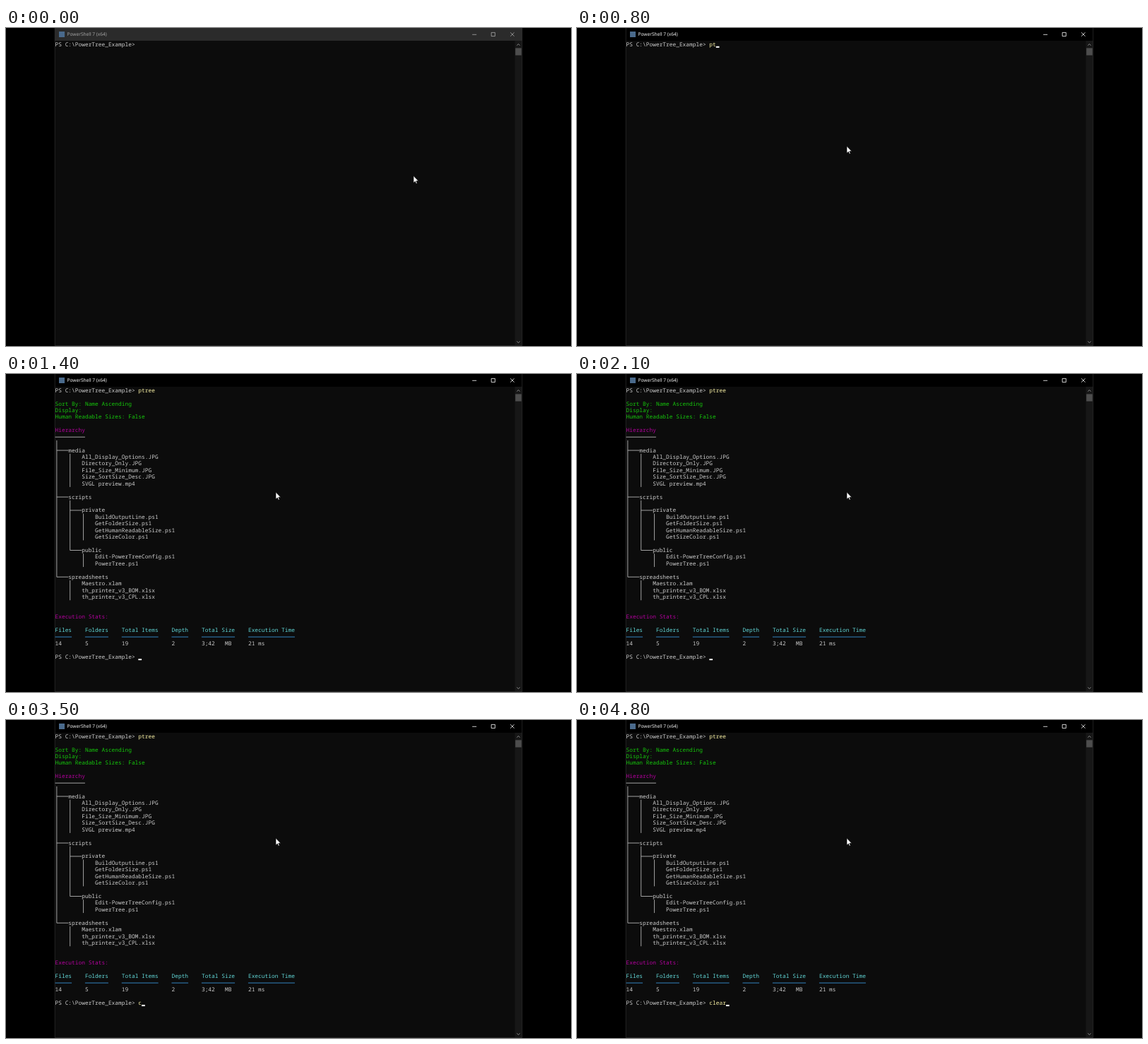
An HTML page for the animation above (5000 ms loop, 800 by 450 pixels).

```html
<!DOCTYPE html>
<html lang="en">
<head>
<meta charset="utf-8">
<title>Terminal tree listing</title>
<style>
  html, body { margin: 0; width: 100%; height: 100%; overflow: hidden; background: #000; }
  svg { display: block; width: 800px; height: 450px; }
  text { white-space: pre; text-rendering: geometricPrecision; }
  #title { font: 6.62px "Open Sans", "Noto Sans", sans-serif; }
  /* 18.333px gives an advance of 11 units, one terminal cell */
  #screen { font: 18.333px "Noto Sans Mono", "DejaVu Sans Mono", monospace; fill: #ccc; }
  #screen .green { fill: #16c60c; }
  #screen .magenta { fill: #b4009e; }
  #screen .cyan { fill: #61d6d6; }
  #screen .input { fill: #f9f1a5; }
  .lines path { fill: none; stroke: #bbb; stroke-width: 2; }
  .lines .rule { stroke: #3a96dd; }
  #bar { fill: #000; }
  #buttons { fill: none; stroke: #fff; stroke-width: .8; }
  #title { fill: #fff; }
  .inactive #bar { fill: #2b2b2b; }
  .inactive #buttons { stroke: #aaa; }
  .inactive #title { fill: #aaa; }
  .arrow { fill: none; stroke: #8a8a8a; stroke-width: 1; }
</style>
</head>
<body>
<svg id="stage" viewBox="0 0 800 450" class="inactive">
  <rect width="800" height="450"/>
  <rect x="69" width="662" height="450" fill="#0c0c0c"/>
  <rect id="bar" x="69" width="662" height="18"/>
  <rect x="75" y="5" width="8" height="8" fill="#4a6a8c"/>
  <text id="title" x="86.5" y="11.4"></text>
  <path id="buttons" d="M660.2 9.3h6M687.2 6.4h5.2v5.2h-5.2zM714.2 6.3l5.4 5.4M719.6 6.3l-5.4 5.4"/>
  <rect x="720.5" y="18" width="10" height="431" fill="#171717"/>
  <rect x="721.2" y="28.4" width="8.6" height="10.2" fill="#4d4d4d"/>
  <path class="arrow" d="M723.4 24.7l2.1-2.1 2.1 2.1M723.4 443.4l2.1 2.1 2.1-2.1"/>
  <path d="M69.25 0V449.5H730.75V0" fill="none" stroke="#303030" stroke-width=".7"/>
  <g id="screen" transform="translate(69.5 18.5) scale(.42857)">
    <g id="first"></g>
    <g id="output"><g class="lines"></g></g>
    <rect id="caret" width="11" height="5" fill="#f2f2f2"/>
    <rect id="selection" x="726" y="330" width="11" height="22" fill="#f2f2f2"/>
  </g>
  <path id="mouse" d="M0 0V17L4 13.3 6.4 19 9 17.9 6.6 12.3H12Z"
        fill="#fff" stroke="#000" stroke-width="1"/>
</svg>
<script>
const NS = 'http://www.w3.org/2000/svg';
const CELL_W = 11, CELL_H = 22, LOOP = 5000;
const $ = id => document.getElementById(id);
const first = $('first'), output = $('output');
const lines = output.querySelector('.lines');

function add(parent, tag, attrs) {
  const el = document.createElementNS(NS, tag);
  for (const key in attrs) el.setAttribute(key, attrs[key]);
  return parent.appendChild(el);
}

function write(parent, row, col, str, cls = '') {
  const el = add(parent, 'text', { x: col * CELL_W, y: row * CELL_H + 17, class: cls });
  el.textContent = str;
  return el;
}

function rule(row, col, count, cls = '') {
  add(lines, 'path', { d: `M${col * CELL_W} ${(row + .5) * CELL_H}h${count * CELL_W}`, class: cls });
}

// Vertical line in a column, covering rows from..to
function trunk(col, from, to) {
  add(lines, 'path', { d: `M${(col + .5) * CELL_W} ${from * CELL_H}V${to * CELL_H}` });
}

function folder(row, col, name, files) {
  rule(row, col - 3.5, 3.5);
  write(output, row, col, name);
  files.forEach((file, i) => write(output, row + 1 + i, col + 4, file));
  if (files.length) trunk(col, row + 1, row + 1 + files.length);
}

const PROMPT = 'PS C:\\PowerTree_Example>';
write(first, 0, 0, PROMPT);
const command = write(first, 0, 25, '', 'input');

write(output, 2, 0, 'Sort By: Name Ascending', 'green');
write(output, 3, 0, 'Display:', 'green');
write(output, 4, 0, 'Human Readable Sizes: False', 'green');
write(output, 6, 0, 'Hierarchy', 'magenta');
rule(7, 0, 9);

trunk(0, 8, 28.5);
trunk(4, 17, 24.5);
folder(9, 4, 'media', ['All_Display_Options.JPG', 'Directory_Only.JPG',
  'File_Size_Minimum.JPG', 'Size_SortSize_Desc.JPG', 'SVGL preview.mp4']);
folder(16, 4, 'scripts', []);
folder(18, 8, 'private', ['BuildOutputLine.ps1', 'GetFolderSize.ps1',
  'GetHumanReadableSize.ps1', 'GetSizeColor.ps1']);
folder(24, 8, 'public', ['Edit-PowerTreeConfig.ps1', 'PowerTree.ps1']);
folder(28, 4, 'spreadsheets', ['Maestro.xlam', 'th_printer_v3_BOM.xlsx', 'th_printer_v3_CPL.xlsx']);

write(output, 34, 0, 'Execution Stats:', 'magenta');
[[0, 'Files', '14'], [9, 'Folders', '5'], [20, 'Total Items', '19'], [35, 'Depth', '2'],
 [44, 'Total Size', '3;42   MB'], [58, 'Execution Time', '21 ms']].forEach(([col, head, value]) => {
  write(output, 36, col, head, 'cyan');
  rule(37, col, head.length, 'rule');
  write(output, 38, col, value);
});
write(output, 40, 0, PROMPT);
const nextCommand = write(output, 40, 25, '', 'input');

const typed = (word, times, t) => word.slice(0, times.filter(at => t >= at).length);
const within = (t, from, to) => t >= from && t < to;
const show = (el, on) => el.setAttribute('visibility', on ? 'visible' : 'hidden');

function render(t) {
  const selecting = within(t, 200, 600), listed = t >= 1400;
  $('stage').setAttribute('class', t < 200 ? 'inactive' : '');
  $('title').textContent = (selecting ? 'Select ' : '') + 'PowerShell 7 (x64)';
  $('mouse').setAttribute('transform', `translate(${t < 200 ? '577 209.3' : '382 167.3'}) scale(.58)`);
  show($('selection'), selecting);
  show(output, listed);

  command.textContent = typed('ptree', [700, 800, 1000, 1100, 1200], t);
  nextCommand.textContent = typed('clear', [3400, 3600, 3700, 3900, 4000], t);
  const active = listed ? nextCommand : command;
  const caret = $('caret');
  caret.setAttribute('x', (25 + active.textContent.length) * CELL_W);
  caret.setAttribute('y', (listed ? 41 : 1) * CELL_H - 5);
  const blinkedOff = [[0, 600], [2200, 2700], [3200, 3400], [4300, 4800]];
  show(caret, !blinkedOff.some(([from, to]) => within(t, from, to)));
}

const start = performance.now();
function frame() {
  render((performance.now() - start) % LOOP);
  requestAnimationFrame(frame);
}
render(0);
requestAnimationFrame(frame);
</script>
</body>
</html>
```
